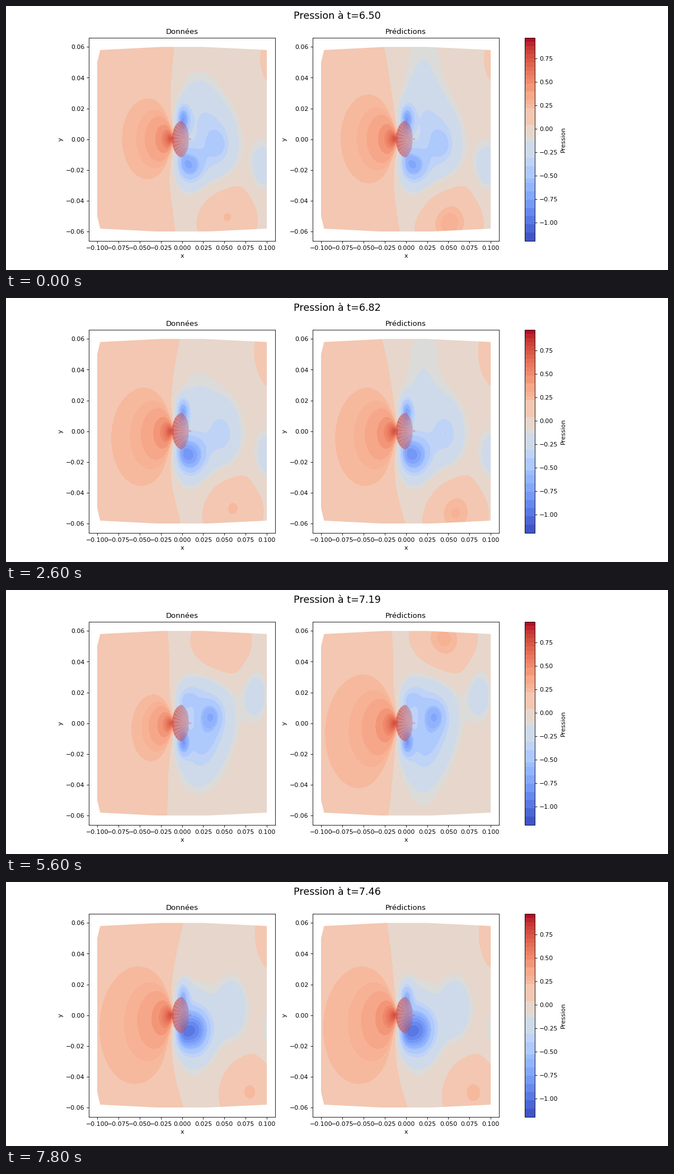
A matplotlib script for the animation above (8 s loop, 1183x473 px).

```python
import numpy as np
import matplotlib.pyplot as plt
from matplotlib.animation import FuncAnimation
from matplotlib.colors import BoundaryNorm, ListedColormap
from matplotlib.patches import Polygon

FRAMES, INTERVAL = 40, 200
PERIOD = 19 / 3            # frames per shedding cycle
V_MIN, V_MAX = -1.195, 0.972
DPI = 78.866

# Colour bands: single steps at the top, wider ones around zero
STEPS = 49
EDGES = np.array([*range(0, 15, 2), 15, 18, 20, 24, 25, 28, 32, 33,
                  *range(34, 39, 2), *range(39, 50)])
FLAT = {15: "#aec9fc", 18: "#bfd3f6", 20: "#cedaea", 24: "#dbdbd9",
        25: "#e7d6cb", 28: "#f3c7b1"}
coolwarm = plt.get_cmap("coolwarm")
bands = [FLAT.get(a, coolwarm((a + b) / 2 / STEPS))
         for a, b in zip(EDGES[:-1], EDGES[1:])]
cmap = ListedColormap(bands)
norm = BoundaryNorm(V_MIN + (V_MAX - V_MIN) * EDGES / STEPS, len(bands))

# Grid in hundredths of a data unit
X = np.linspace(-10, 10, 304)[None, :]
Y = np.linspace(-6, 6, 332)[:, None]
R = np.abs(Y)


def bell(t, centre, width):
    return np.exp(-((t - centre) / width) ** 2)


def pulse(u, centre, width):
    """Bell over the cycle, where phase 1 is phase 0 again."""
    return bell((u - centre + 0.5) % 1, 0.5, width)


def bump(out, x, y, sx, sy, amp):
    return amp * bell(X, x, sx) * bell(out, y, sy)


def vortex(out, age):
    """A vortex that grows behind the body, then drifts downstream."""
    x = 0.9 + 0.62 * np.log1p(np.exp((age - 1.177) / 0.06))
    y = 0.7 + 1.15 * np.cos(2 * np.pi * (age - 0.95))
    birth = np.clip((age - 0.8) / 0.2, 0, 1)
    size = 1.4 + 1.3 * bell(age, 1.25, 0.4)
    core = 1 + bell(age, 1.17, 0.2)
    wide = -birth * (0.2 + 0.2 * bell(age, 1.35, 0.25))
    deep = -0.6 * birth * bell(age, 1.17, 0.24)
    return (bump(out, x, y, size, size * (0.85 + 0.35 * (age - 1)), wide)
            + bump(out, x, y, core, core * 0.68, deep))


def half_wake(out, u, predicted):
    """Wake parts that belong to one side; out is the distance outward."""
    v = sum(vortex(out, u + turn) for turn in range(3))
    v = v + bump(out, 0.05, 1.25, 0.8, 0.9, -0.15 - 0.45 * pulse(u, 0.5, 0.25))
    v = v + bump(out, 1.8, 1.9, 2.5, 2.3, -0.28 * pulse(u, 0.43, 0.14))

    # Pressure ridges beside and behind the wake
    since = (u - 0.66) % 1
    ridge_x = 4 + 32 * since ** 3
    ridge = 0.25 * (1 - bell(since, 0, 0.12))
    v = v + bump(out, ridge_x, 5, 3.2, 2.2, ridge)
    v = v + bump(out, 11, 5.2, 2.8, 2.8, 0.16 * pulse(u, 0.6, 0.14))
    if predicted:
        v = v + bump(out, 2.2, 5.6, 2.6, 2.6, -0.09 * pulse(u, 0.52, 0.11))
        v = v + bump(out, ridge_x - 0.6, 6, 3.2, 1.4, 0.1 * pulse(u, 0.97, 0.12))
    return v


def front_shift(u, predicted):
    shift = 0.4 + 1.1 * np.cos(4 * np.pi * (u - 0.13))
    return shift - 3 * pulse(u, 0.6, 0.13) * predicted


def pressure(phase, predicted):
    # Stagnation zone: ovals that touch the nose of the body
    tilt = np.radians(-9 * np.tanh(2.5 * np.sin(2 * np.pi * phase)))
    along = -(X + 0.95) * np.cos(tilt) + Y * np.sin(tilt)
    across = (X + 0.95) * np.sin(tilt) + Y * np.cos(tilt)
    size = (along ** 2 + (1.17 * across) ** 2) / np.maximum(along, 1e-3)
    far = 0.08 + 0.035 * np.cos(4 * np.pi * (phase - 0.14))
    if predicted:
        far += 0.065 * max(0, np.cos(4 * np.pi * (phase + 0.09))) ** 2
    nose = np.clip(far + 1.05 / (size + 1), 0.13, 0.93)

    below, above = phase % 1, (phase + 0.5) % 1
    wake = -0.02 + half_wake(-Y, below, predicted) + half_wake(Y, above, predicted)

    # Front between the nose and the wake
    shift = np.where(Y < 0, front_shift(below, predicted), front_shift(above, predicted))
    edge = -1.0 - 0.5 * Y ** 2 / (Y ** 2 + 2) + shift * (Y / 6) ** 2
    mix = 1 / (1 + np.exp(np.clip((X - edge) / (0.15 + 0.1 * R), -40, 40)))
    return mix * nose + (1 - mix) * wake


def body_tint():
    """Translucent red fan stretched across the body."""
    x = np.linspace(-1.3, 1.1, 80)[None, :]
    y = np.linspace(-1.2, 1.2, 140)[:, None]
    t = np.clip(np.abs(y) / 1.18, 0, 1)
    inside = (x > -1.2 * np.sqrt(1 - t ** 2)) & (x < 0.75 * (1 - t ** 3)) & (t < 1)
    inside |= (t < 0.04) & (x > 0) & (x < 1.05)
    stripes = 0.09 * np.sin(50 * np.arctan2(y, 1.1 - x))
    rgba = np.empty(inside.shape + (4,))
    rgba[..., :3] = 0.79, 0.3, 0.3
    rgba[..., 3] = inside * np.clip(0.68 - 0.2 * (x + 1) + stripes, 0, 1)
    return rgba


fig, axes = plt.subplots(1, 2, figsize=(1183.01 / DPI, 473.01 / DPI), dpi=DPI)
title = fig.suptitle("", fontsize=16)
corners = [(-.1, .05), (-.0965, .058), (-.025, .06), (.025, .06), (.1, .058)]
outline = corners + [(x, -y) for x, y in reversed(corners)]

images = []
for ax, name in zip(axes, ("Données", "Prédictions")):
    image = ax.imshow(np.zeros((Y.size, X.size)), cmap=cmap, norm=norm,
                      origin="lower", extent=(-.1, .1, -.06, .06),
                      aspect="auto", interpolation="bilinear")
    image.set_clip_path(Polygon(outline, transform=ax.transData))
    ax.imshow(body_tint(), origin="lower", extent=(-.013, .011, -.012, .012),
              aspect="auto", interpolation="bilinear")
    ax.set(title=name, xlabel="x", ylabel="y", xlim=(-.11, .11), ylim=(-.066, .066),
           xticks=np.linspace(-.1, .1, 9), yticks=np.linspace(-.06, .06, 7))
    images.append(image)

bar = fig.colorbar(images[0], ax=axes, spacing="proportional",
                   ticks=np.arange(-1, 1, 0.25), label="Pression")
bar.minorticks_off()


def update(i):
    title.set_text(f"Pression à t={6.5015 + 0.0246 * i:.2f}")
    for predicted, image in enumerate(images):
        image.set_data(pressure(i / PERIOD, predicted))
    return [title, *images]


anim = FuncAnimation(fig, update, frames=FRAMES, interval=INTERVAL,
                     repeat=True, repeat_delay=0)
plt.show()
```
